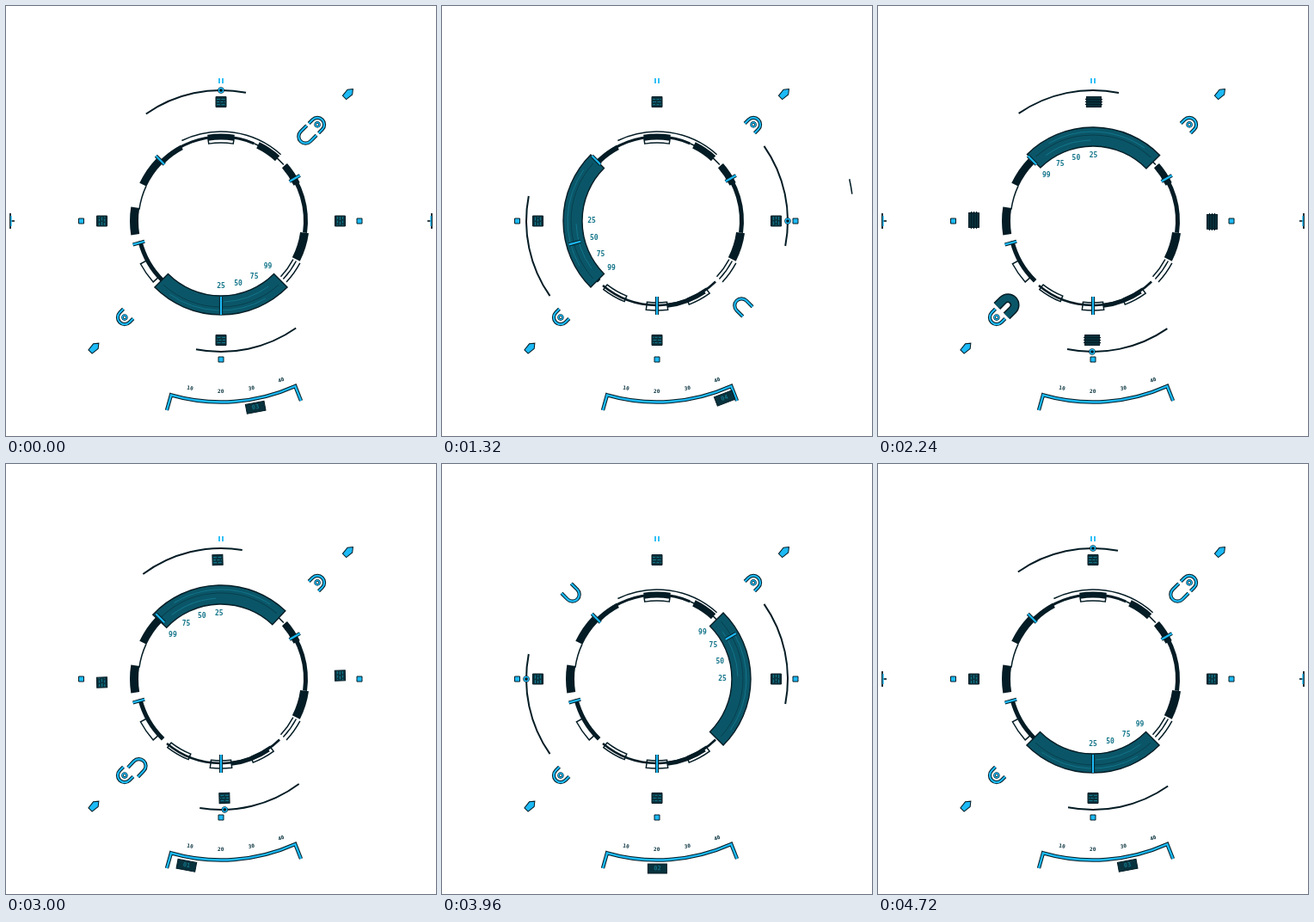
Recreate the animation shown at these times as an HTML page with a canvas. Size 500 by 500 pixels, loop 4.76 s.

```html
<!DOCTYPE html>
<html lang="en">
<head>
<meta charset="utf-8">
<title>Radial gauge</title>
<style>
html, body { margin: 0; width: 100%; height: 100%; overflow: hidden; background: #fff; }
canvas { display: block; }
</style>
</head>
<body>
<canvas id="stage" width="500" height="500"></canvas>
<script>
const ctx = document.getElementById('stage').getContext('2d');
const LOOP = 4760, TURN = 660, BEAT = LOOP / 4;
const STARTS = [600, 1740, 2900, 4030];
const CYAN = '#1cbaf6', INK = '#041c25', BAND = '#0a5668', TEAL = '#127489', PANEL = '#08323d';
const rad = deg => deg * Math.PI / 180;
const clamp = v => Math.min(1, Math.max(0, v));

// back ease on both ends with a small overshoot
function swing(p) {
  const c = 1, u = 2 * clamp(p), v = u - 2;
  return u < 1 ? u * u * ((c + 1) * u - c) / 2 : (v * v * ((c + 1) * v + c) + 2) / 2;
}

function at(x, y, deg, draw) {
  ctx.save();
  ctx.translate(x, y);
  ctx.rotate(rad(deg));
  draw();
  ctx.restore();
}

function polar(r, deg, draw, tilt = deg) {
  at(r * Math.cos(rad(deg)), r * Math.sin(rad(deg)), tilt, draw);
}

function stroke(color, width) {
  ctx.strokeStyle = color;
  ctx.lineWidth = width;
  ctx.stroke();
}

function arc(r, from, to, width, color = INK) {
  ctx.beginPath();
  ctx.arc(0, 0, r, rad(from), rad(to));
  stroke(color, width);
}

function bright(width = 2.2) {
  stroke(INK, width + 2);
  stroke(CYAN, width);
}

function line(x1, y1, x2, y2) {
  ctx.beginPath();
  ctx.moveTo(x1, y1);
  ctx.lineTo(x2, y2);
}

function box(w, h, fill, edge = INK) {
  ctx.beginPath();
  ctx.rect(-w / 2, -h / 2, w, h);
  ctx.fillStyle = fill;
  ctx.fill();
  stroke(edge, 1);
}

function sector(r1, r2, from, to) {
  ctx.beginPath();
  ctx.arc(0, 0, r2, rad(from), rad(to));
  ctx.arc(0, 0, r1, rad(to), rad(from), true);
  ctx.closePath();
}

function label(text, size, color) {
  ctx.font = `bold ${size}px "DejaVu Sans Mono", monospace`;
  ctx.textAlign = 'center';
  ctx.textBaseline = 'middle';
  ctx.fillStyle = color;
  ctx.fillText(text, 0, 0);
}

function hook(leg, blurred) {
  ctx.beginPath();
  ctx.moveTo(leg, -8);
  ctx.lineTo(0, -8);
  ctx.arc(0, 0, 8, rad(-90), rad(90), true);
  ctx.lineTo(leg, 8);
  if (blurred) {
    stroke(INK, 11);
    stroke(BAND, 8);
  } else bright();
}

function dot(r = 2.5) {
  ctx.beginPath();
  ctx.arc(0, 0, r, 0, 7);
  stroke(INK, 2.6);
  stroke(CYAN, 1.3);
}

function arrow() {
  ctx.beginPath();
  ctx.moveTo(-8, 0);
  ctx.lineTo(-3, -4);
  ctx.lineTo(6, -3);
  ctx.lineTo(6, 3);
  ctx.lineTo(-3, 4);
  ctx.closePath();
  ctx.fillStyle = CYAN;
  ctx.fill();
  stroke(INK, 1);
}

function ring() {
  arc(98, -67, -42, 1.5);
  arc(98.5, -41, 8, 5);
  arc(98, 46, 130, 2.5);
  arc(97, 134, 166, 5);
  arc(96, 188, 205, 1.5);
  arc(98, 206, 293, 3);
  arc(104, 244, 312, 1.5);
  const blocks = [[98, 8, 27, 10], [101, 171, 189, 10], [100, 205, 224, 9], [97, 226, 242, 6],
    [98, 261, 279, 7], [98, 296, 312, 8], [98, 319, 334, 8], [99, 56, 83, 5]];
  for (const [r, from, to, width] of blocks) arc(r, from, to, width);
  for (const r of [95, 99, 104]) arc(r, 28, 43, 1.5);
  const frames = [[97, 106, 138, 152], [94, 101, 112, 128], [95, 104, 83, 97],
    [97, 104, 54, 69], [91, 96, 261, 279]];
  for (const f of frames) {
    sector(...f);
    stroke(INK, 1.5);
  }
}

function band() {
  sector(87, 109, 45, 135);
  ctx.fillStyle = BAND;
  ctx.fill();
  stroke(INK, 1.4);
  arc(94, 54, 88, 1, TEAL);
  arc(100, 48, 132, 1, '#083f4e');
  arc(104, 60, 125, 1, TEAL);
}

function gauge(t, turns) {
  ctx.beginPath();
  ctx.moveTo(-63, 220);
  ctx.arc(0, 0, 210.5, rad(106), rad(65.8), true);
  ctx.lineTo(93, 209);
  bright(2.4);
  ['10', '20', '30', '40'].forEach((text, i) =>
    polar(198, 100.5 - 10.4 * i, () => label(text, 6, PANEL), 10.4 * (1 - i)));

  const first = turns < 1.5;
  const angle = first ? 79.5 - 10.4 * Math.min(turns, 1.03) : 100.3 - 10.4 * (Math.max(turns, 1.97) - 2);
  ctx.globalAlpha = t < 2000 ? 1 - clamp((t - 1740) / 160) : clamp((t - 2260) / 200);
  polar(220.5, angle, () => {
    box(22, 11, PANEL);
    label('0' + (1 + Math.round(turns + 2) % 4), 7, TEAL);
  }, angle - 90);
  ctx.globalAlpha = 1;
}

function brackets(t) {
  const phase = t % BEAT;
  const shown = phase > 600 ? clamp((phase - 850) / 200) : 1 - clamp((phase - 20) / 100);
  if (!shown) return;
  for (const side of [-1, 1]) {
    const x = side * (245 + 14 * (1 - shown));
    line(x, -9, x, 9);
    stroke(INK, 1.8);
    line(x - side * 5, 0, x, 0);
    stroke(INK, 1.6);
    line(x - side, -6, x - side, 6);
    stroke(CYAN, 1.4);
  }
}

// square panels lie along the tangent and smear while they travel
function panels(rot, blurred) {
  const half = blurred ? 10 : 5;
  for (let i = 0; i < 4; i++) polar(138.5, rot + 90 * i, () => {
    box(blurred ? 17 : 12, 12, PANEL);
    for (const y of [-3, 0, 3]) {
      line(-half, y, half, y);
      ctx.setLineDash(blurred ? [] : [3 + (i + y + 3) % 2, 1.5]);
      stroke(blurred ? INK : TEAL, 1.2);
    }
    ctx.setLineDash([]);
  }, rot + 90 * i + 90);
}

function fixedMarks() {
  for (const x of [-2, 2]) {
    line(x, -166, x, -160);
    stroke(CYAN, 1.8);
  }
  for (const [x, y] of [[-162.5, 0], [161, 0], [0, 161]]) at(x, y, 0, () => box(6, 6, CYAN));
  for (const deg of [-45, 135]) {
    polar(158.5, deg, () => {
      at(0, 0, 180, () => hook(6));
      dot();
    });
    polar(209, deg, arrow, 135);
  }
}

function draw(t) {
  const turns = STARTS.reduce((sum, s) => sum + swing((t - s) / TURN), 0);
  const rot = turns * 90;
  const blurred = STARTS.some(s => t > s + 200 && t < s + 540);
  ctx.clearRect(0, 0, 500, 500);
  at(250, 250, 0, () => {
    ring();
    at(0, 0, rot, () => {
      band();
      arc(152, -125, -79, 2);
      arc(152, 55, 101, 2);
      polar(152, -90, () => dot());
      polar(139, -45, () => hook(10, blurred));
    });
    [[225, 93, 107], [-30, 92, 106], [165, 92, 106], [90, 88, 109]].forEach(([deg, r1, r2]) =>
      at(0, 0, deg, () => {
        line(r1, 0, r2, 0);
        bright();
      }));
    ['25', '50', '75', '99'].forEach((text, i) =>
      polar(76, 90 + rot - 15.3 * i, () => label(text, 8, TEAL), 0));
    panels(rot, blurred);
    fixedMarks();
    gauge(t, turns);
    brackets(t);
    if (t > 1200 && t < 1860) {
      const deg = -(t - 1200) / 12;
      arc(229, deg - 2.2, deg + 2.2, 1.5);
    }
  });
}

function tick() {
  draw(performance.now() % LOOP);
  requestAnimationFrame(tick);
}
tick();
</script>
</body>
</html>
```
